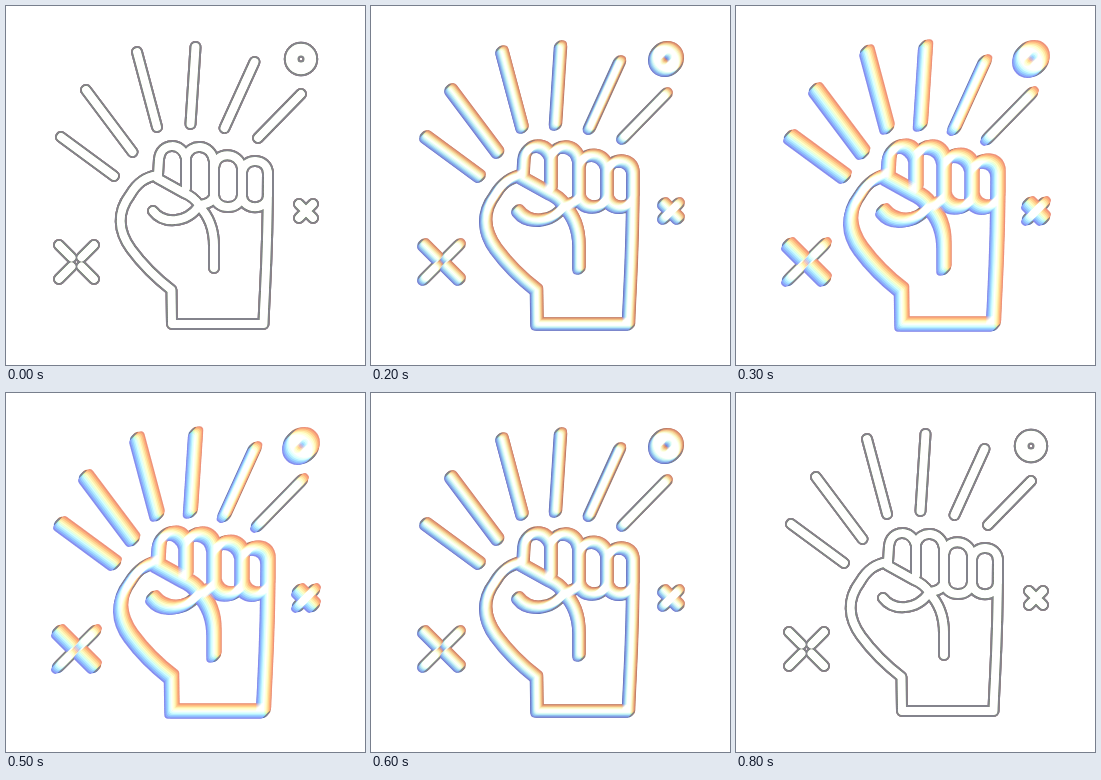
Animation of 359x359 px, one loop 0.9 s. Source, as an HTML page with a canvas:

```html
<!DOCTYPE html>
<html lang="en">
<head>
<meta charset="utf-8">
<title>Raised fist</title>
<style>
  html, body { margin: 0; width: 100%; height: 100%; overflow: hidden; background: #fff; }
  canvas { display: block; width: 359px; height: 359px; }
</style>
</head>
<body>
<canvas id="stage" width="359" height="359"></canvas>
<script>
const SIZE = 359, STEP_MS = 100, STEPS = 9, PEAK = 4;
const CORE_WIDTH = 8, OUTLINE_WIDTH = 12, SHIFT_PER_LEVEL = 1.25;
const MEAN_LIGHT = 183;

// Colours of the shifted copies, from upper right to lower left.
const SPECTRUM = ["#ff9678", "#ffbe64", "#ffeb82", "#beffb4", "#82f0f0", "#78c3ff", "#828cff"];

const art = new Path2D([
  // rays
  "M55 131L108 170 M80 84L126.500 146 M131 46L151 121",
  "M189.500 41L184.500 118 M248.500 56L218.500 122 M295 88L252 132",
  // crosses
  "M53 239L65.500 251.500 M88 239L75.500 251.500 M53 273L65.500 260.500 M88 273L75.500 260.500",
  "M293 198L307 212 M307 198L293 212",
  // hand contour and wrist
  "M152 169C139 171 131 177 124 189C111 206 112 225 125 243C136 258 150 272 165.500 284",
  "L166 318H257.500C258.500 285 262 250 262 166",
  // fingers
  "M152 169L153 153C155 136 176 136 180 152V182",
  "M180 151C184 137 205 137 208 155V190Q206 198 193 199",
  "M208 162C209 145 233 145 236 162V189C235 205 209 205 208 189",
  "M236 166C238 151 262 151 262 168V190C261 205 237 205 236 190",
  // palm edge and thumb
  "M151 172L178 187Q188 191 193 199",
  "M147 205C157 218 180 218 193 200C202 209 208 222 208 240V262"
].join(""));
for (const radius of [11.2, 7.5]) {
  const ring = new Path2D();
  ring.arc(295, 53, radius, 0, Math.PI * 2);
  art.addPath(ring);
}

function makeContext() {
  const canvas = document.createElement("canvas");
  canvas.width = canvas.height = SIZE;
  const ctx = canvas.getContext("2d", { willReadFrequently: true });
  ctx.lineCap = ctx.lineJoin = "round";
  return ctx;
}

function strokeArt(ctx, shift, width, color) {
  ctx.save();
  ctx.translate(shift, -shift);
  ctx.lineWidth = width;
  ctx.strokeStyle = color;
  ctx.stroke(art);
  ctx.restore();
}

// Averages the overlapping copies; where all of them meet, the result is white.
function renderLight(level) {
  const ctx = makeContext();
  const copies = SPECTRUM.length;
  ctx.globalCompositeOperation = "lighter";
  ctx.globalAlpha = 1 / copies;
  SPECTRUM.forEach((color, i) => {
    const shift = level * SHIFT_PER_LEVEL * (1 - 2 * i / (copies - 1));
    strokeArt(ctx, shift, CORE_WIDTH, color);
  });

  const shade = 0.55 + 0.45 * level / PEAK;
  const lift = 255 - shade * MEAN_LIGHT;
  const image = ctx.getImageData(0, 0, SIZE, SIZE);
  const { data } = image;
  for (let p = 0; p < data.length; p += 4) {
    const cover = data[p + 3] / 255;
    for (let c = p; c < p + 3; c++) data[c] = data[c] * shade + lift * cover;
    data[p + 3] = 255 * cover * copies;
  }
  ctx.putImageData(image, 0, 0);
  return ctx.canvas;
}

function renderPose(level) {
  const ctx = makeContext();
  const tintShift = level * 0.4;
  ctx.fillStyle = "#fff";
  ctx.fillRect(0, 0, SIZE, SIZE);
  strokeArt(ctx, -tintShift, OUTLINE_WIDTH, "#5a78b8");
  strokeArt(ctx, tintShift, OUTLINE_WIDTH, "#b97a5c");
  strokeArt(ctx, 0, OUTLINE_WIDTH, "#83838c");
  ctx.drawImage(renderLight(level), 0, 0);
  return ctx.canvas;
}

const poses = Array.from({ length: PEAK + 1 }, (_, level) => renderPose(level));
const stage = document.getElementById("stage").getContext("2d");

function tick() {
  const step = Math.floor(performance.now() / STEP_MS) % STEPS;
  stage.drawImage(poses[PEAK - Math.abs(PEAK - step)], 0, 0);
  requestAnimationFrame(tick);
}
tick();
</script>
</body>
</html>
```
